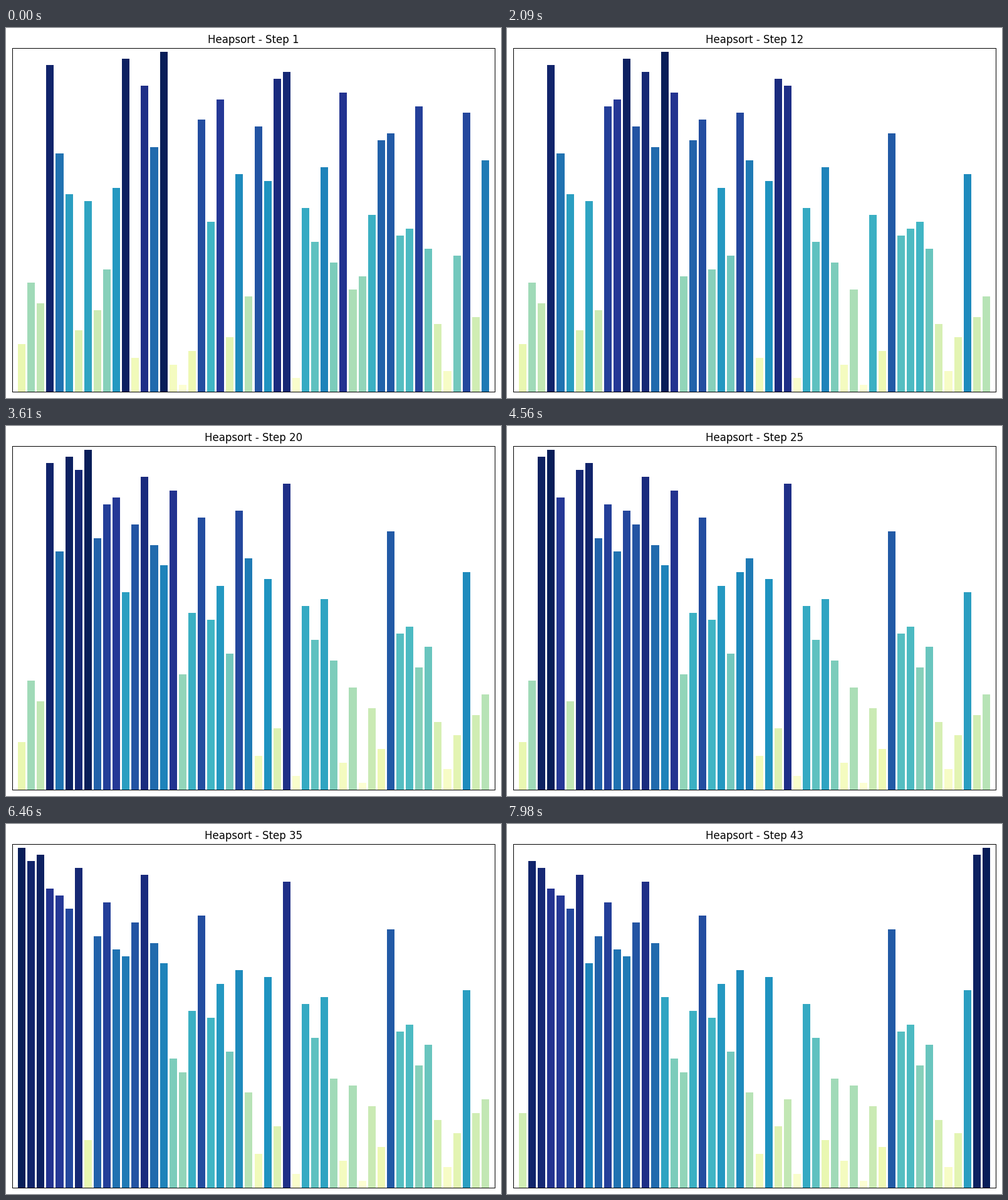
Write a matplotlib script that moves like this. It is 790 px wide and 590 px high and loops after 8000 ms.

```python
from itertools import islice

import matplotlib.pyplot as plt
from matplotlib.animation import FuncAnimation

W, H, DPI = 790, 590, 100
LOOP, TICK, HOLD = 8000, 20, 190

# The shuffled list to be sorted.
START = [7, 16, 13, 48, 35, 29, 9, 28, 12, 18, 30, 49, 5, 45, 36, 50, 4,
         1, 6, 40, 25, 43, 8, 32, 14, 39, 31, 46, 47, 2, 27, 22, 33, 19,
         44, 15, 17, 26, 37, 38, 23, 24, 42, 21, 10, 3, 20, 41, 11, 34]
N = len(START)


def sift_down(a, root, size):
    """Yield the list after every swap."""
    while True:
        family = [i for i in (root, 2 * root + 1, 2 * root + 2) if i < size]
        top = max(family, key=lambda i: a[i])
        if top == root:
            return
        a[root], a[top] = a[top], a[root]
        yield a[:]
        root = top


def heapsort(values):
    a = list(values)
    yield a[:]
    for root in reversed(range(len(a) // 2)):
        yield from sift_down(a, root, len(a))
    for end in range(len(a) - 1, 0, -1):
        a[0], a[end] = a[end], a[0]
        yield a[:]
        yield from sift_down(a, 0, end)


steps = list(islice(heapsort(START), LOOP // HOLD + 1))
cmap = plt.get_cmap("YlGnBu")

plt.rcParams["font.family"] = "DejaVu Sans"
plt.rcParams["axes.linewidth"] = 72 / DPI  # one pixel
fig = plt.figure(figsize=(W / DPI, H / DPI), dpi=DPI, facecolor="white")
ax = fig.add_axes([10 / W, 10 / H, 770 / W, 547.667 / H])
ax.set(xlim=(-1, N), ylim=(0, N * 1.01), xticks=[], yticks=[])
bars = ax.bar(range(N), START, width=0.8)
title = ax.set_title("", fontsize=12)


def draw(frame):
    k = (frame * TICK + TICK // 2) // HOLD
    for bar, value in zip(bars, steps[k]):
        bar.set_height(value)
        bar.set_facecolor(cmap(value / N))
    title.set_text(f"Heapsort - Step {k + 1}")
    return [*bars, title]


anim = FuncAnimation(fig, draw, frames=LOOP // TICK, interval=TICK,
                     init_func=lambda: draw(0), repeat=True, repeat_delay=0)
plt.show()
```
